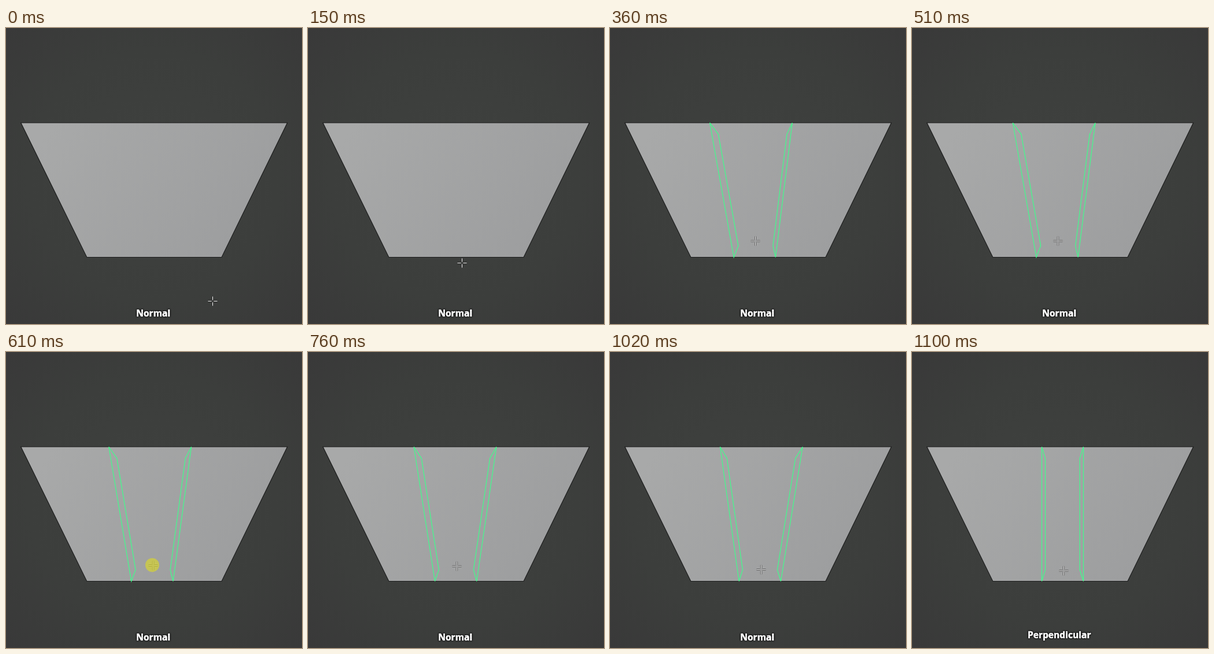
An HTML page for the animation above (2.13 s loop, 512 px wide and 512 px high).

```html
<!DOCTYPE html>
<html lang="en">
<head>
<meta charset="utf-8">
<title>Loop cut modes</title>
<style>
  html, body { margin: 0; width: 100%; height: 100%; overflow: hidden; background: #3b3c3b; }
  svg { display: block; width: 100vw; height: 100vh; }
  .face { fill: url(#shade); stroke: #1c1d1d; stroke-width: 1.2; }
  .cut { fill: none; stroke: #42fb8c; stroke-width: 1.25; }
  .rim { stroke: #222; stroke-width: 3; stroke-opacity: .65; }
  .arms { stroke: #fff; stroke-width: 1.1; }
  text {
    font: 700 15.6px "Open Sans", "Noto Sans", sans-serif;
    text-anchor: middle; fill: #fff;
    stroke: #fff; stroke-width: .6; stroke-linejoin: round;
    filter: drop-shadow(0 0 1px #000) drop-shadow(0 0 1px #000);
  }
</style>
</head>
<body>
<svg viewBox="0 0 512 512">
  <defs>
    <radialGradient id="back" gradientUnits="userSpaceOnUse" cx="256" cy="256" r="362">
      <stop offset="0" stop-color="#3f413f"/>
      <stop offset=".6" stop-color="#3c3e3c"/>
      <stop offset="1" stop-color="#393939"/>
    </radialGradient>
    <linearGradient id="shade" gradientUnits="userSpaceOnUse" x1="90" y1="150" x2="400" y2="370">
      <stop offset="0" stop-color="#a8a9a9"/>
      <stop offset="1" stop-color="#9d9e9f"/>
    </linearGradient>
    <path id="plus" d="M-8 0H-2M2 0H8M0 -8V-2M0 2V8"/>
  </defs>
  <rect width="512" height="512" fill="url(#back)"/>
  <path class="face" d="M25.8 164H486.6L373 396.5H139.8Z"/>
  <path class="cut" id="cut"/>
  <g id="cursor">
    <use href="#plus" class="rim"/>
    <use href="#plus" class="arms"/>
  </g>
  <circle id="click" cx="253" cy="368.5" r="12" fill="#e0dc20" fill-opacity=".6"/>
  <text id="mode" x="254.7"></text>
</svg>
<script>
  const LOOP = 2130, SWITCH = 1100;
  const ARRIVE = 360, DRIFT = 480, PRESS = 560, RELEASE = 710;
  const TOP = 164, BOTTOM = 396.5, HALF = .155;

  const [cut, cursor, click, mode] =
    ["cut", "cursor", "click", "mode"].map(id => document.getElementById(id));

  const mix = (a, b, k) => a + (b - a) * k;
  const hold = (t, from, step) => from + Math.floor((t - from) / step) * step;
  const easeOut = (k, power) => 1 - (1 - k) ** power;

  // The pointer swoops onto the face, rests, then drifts down and right
  function pointer(t) {
    if (t < DRIFT) {
      const k = t < 20 ? 0 : Math.min(1, hold(t, 20, 30) / ARRIVE);
      return [mix(357, 251, easeOut(k, 4)), mix(472, 368, easeOut(k, 2.05))].map(Math.round);
    }
    const seen = t < SWITCH ? Math.max(DRIFT, hold(t, 510, 100)) : SWITCH;
    const k = (seen - DRIFT) / (SWITCH - DRIFT);
    return [mix(251, 262, easeOut(k, 1.55)), mix(368, 378, k ** 1.6)].map(Math.round);
  }

  // Point on the face: u across its width, y down the screen
  const down = y => (y - TOP) / (BOTTOM - TOP);
  const leftAt = y => mix(26, 140, down(y));
  const widthAt = y => mix(460.5, 233, down(y));
  const across = (u, y) => leftAt(y) + u * widthAt(y);

  // A wall outline: near edge on the face, far edge pulled towards the vanishing point
  function wall(top, bottom) {
    const far = (x, y) => `${mix(260, x, .83)} ${mix(280.5, y, .83)}`;
    return `M${top} ${TOP}L${far(top, TOP)}L${far(bottom, BOTTOM)}L${bottom} ${BOTTOM}Z`;
  }

  function cutPath(x, y, square) {
    if (y >= BOTTOM) return "";
    const mid = (x - leftAt(y)) / widthAt(y) - .0058;
    return [mid - HALF, mid + HALF].map(u => {
      const foot = across(u, BOTTOM);
      return square ? wall(Math.floor(foot) + .5, Math.floor(foot) + .5)
                    : wall(across(u, TOP), foot);
    }).join("");
  }

  function draw(t) {
    const [x, y] = pointer(t);
    const square = t >= SWITCH;
    cursor.setAttribute("transform", `translate(${x + .5} ${y + .5})`);
    cut.setAttribute("d", cutPath(x, y, square));
    click.setAttribute("visibility", t >= PRESS && t < RELEASE ? "visible" : "hidden");
    mode.textContent = square ? "Perpendicular" : "Normal";
    mode.setAttribute("y", square ? 494.5 : 499);
  }

  const start = performance.now();
  function tick() {
    draw((performance.now() - start) % LOOP);
    requestAnimationFrame(tick);
  }
  tick();
</script>
</body>
</html>
```
